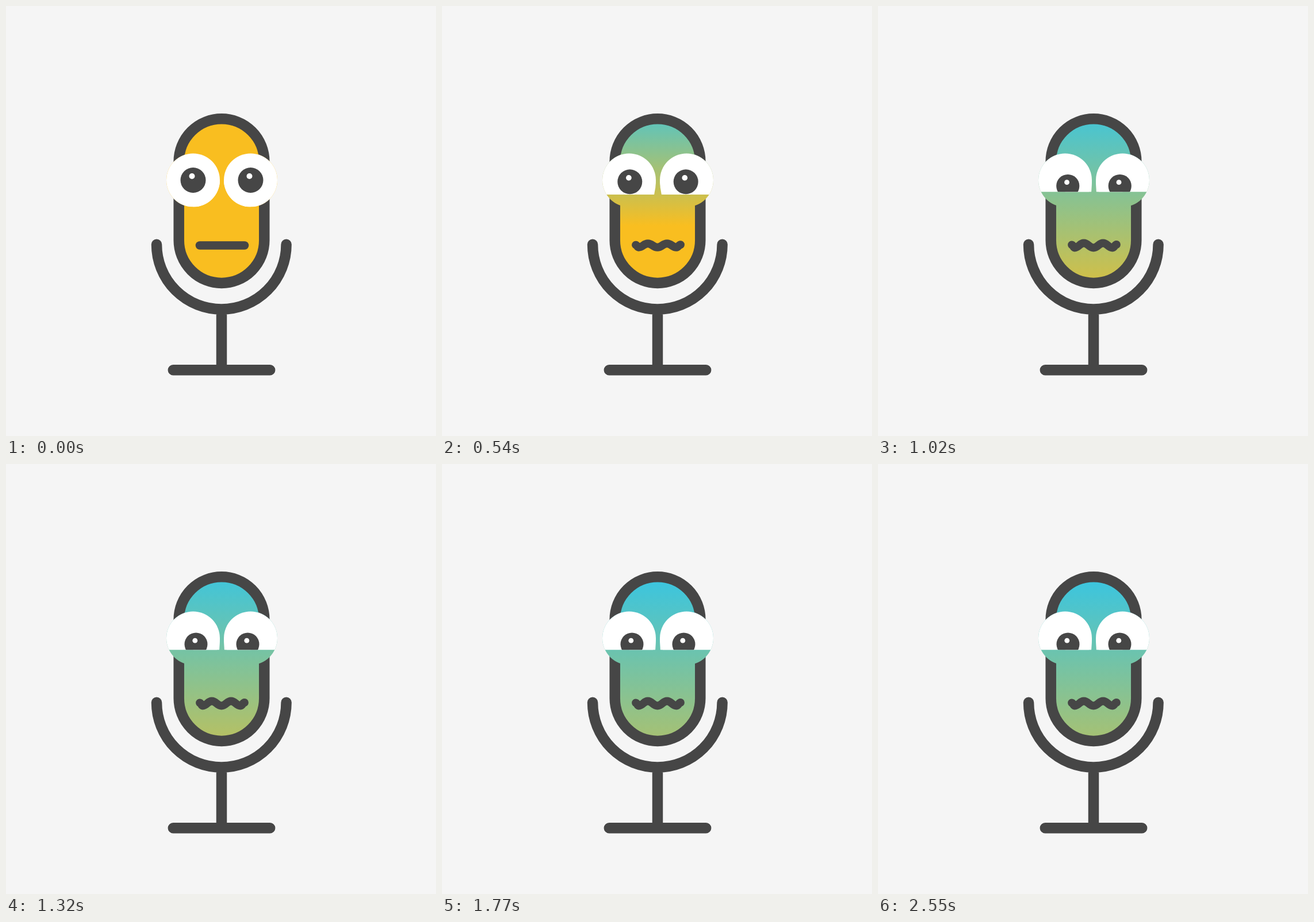
An HTML page with a canvas that plays this animation: 748x748 px, repeating every 2580 ms.

```html
<!DOCTYPE html>
<html lang="en">
<head>
<meta charset="utf-8">
<title>Queasy microphone</title>
<style>
  html, body { margin: 0; width: 100%; height: 100%; overflow: hidden; background: #f5f5f5; }
  canvas { display: block; }
</style>
</head>
<body>
<canvas id="stage" width="748" height="748"></canvas>
<script>
const ctx = document.getElementById('stage').getContext('2d');
const LOOP = 2580, STEP = 30;
const DARK = '#464646', BLUE = '#3cc5de', YELLOW = '#f9be20';
const EYE_Y = 303, EYE_R = 46.5, MOUTH_Y = 416.5;

const mix = (a, b, k) => a + (b - a) * k;
const progress = (t, from, to) => Math.min(1, Math.max(0, (t - from) / (to - from)));
const smooth = p => p * p * (3 - 2 * p);

function disc(x, y, r, color) {
  ctx.fillStyle = color;
  ctx.beginPath();
  ctx.arc(x, y, r, 0, 2 * Math.PI);
  ctx.fill();
}

function stroke(width) {
  ctx.strokeStyle = DARK;
  ctx.lineWidth = width;
  ctx.lineCap = ctx.lineJoin = 'round';
  ctx.stroke();
}

// Blue flows in from the top while the yellow end sinks below the body.
function skinColor(t) {
  const p = progress(t, 0, 1740);
  const yellowY = 690 - 568 * (1 - p) ** 1.65;
  const blueY = Math.min(140 + 65 * p, yellowY - 40);
  const fill = ctx.createLinearGradient(0, blueY, 0, yellowY);
  fill.addColorStop(0, BLUE);
  fill.addColorStop(1, YELLOW);
  return fill;
}

function drawStand() {
  ctx.beginPath();
  ctx.arc(374.8, 414.8, 112.8, Math.PI, 0, true);
  ctx.moveTo(375, 528);
  ctx.lineTo(375, 633);
  ctx.moveTo(290.8, 633.2);
  ctx.lineTo(459.2, 633.2);
  stroke(18.5);
}

function drawBody(skin) {
  ctx.beginPath();
  ctx.roundRect(300.7, 196.3, 148.6, 285.6, 74.3);
  ctx.fillStyle = skin;
  ctx.fill();
  stroke(18.5);
}

// side is 1 when the nose lies to the right of the eye, -1 when to the left.
function drawEye(x, side, skin, lid, look) {
  const lidY = mix(EYE_Y + EYE_R, 323.3, lid);
  disc(x, EYE_Y, EYE_R, skin);

  ctx.save();
  ctx.beginPath();
  ctx.rect(x - 60, 240, 120, lidY - 240);
  ctx.clip();
  disc(x, EYE_Y, EYE_R, '#fff');
  // The inner edge straightens as the lid rises.
  ctx.beginPath();
  ctx.ellipse(x, EYE_Y, EYE_R, EYE_R + 55 * lid ** 4, 0,
    side > 0 ? 0 : Math.PI, Math.PI / 2, side < 0);
  ctx.lineTo(x, EYE_Y);
  ctx.fill();

  const px = x + side * 5 * look;
  const py = EYE_Y + 10.5 * look;
  disc(px, py, mix(22, 20, look), DARK);
  disc(px - mix(2, 1.7, look), py - mix(7, 6.3, look), mix(5, 4.4, look), '#fff');
  ctx.restore();
}

function drawMouth(wave) {
  const bends = [[337, -1], [342, 4], [358, -4], [374.8, 4], [391.5, -4], [408, 4], [415, -1.5]];
  let [px, py] = [337, MOUTH_Y - wave];
  ctx.beginPath();
  ctx.moveTo(px, py);
  for (const [x, dy] of bends.slice(1)) {
    const y = MOUTH_Y + dy * wave, half = (x - px) * 0.45;
    ctx.bezierCurveTo(px + half, py, x - half, y, x, y);
    [px, py] = [x, y];
  }
  stroke(mix(14.6, 13.8, wave));
}

function draw(now) {
  const t = Math.floor(now % LOOP / STEP) * STEP;
  const queasy = smooth(progress(t, 0, 740));
  const look = smooth(progress(t, 240, 1140));
  const skin = skinColor(t);

  ctx.fillStyle = '#f5f5f5';
  ctx.fillRect(0, 0, 748, 748);
  drawStand();
  drawBody(skin);
  drawEye(325.5, 1, skin, queasy, look);
  drawEye(425.5, -1, skin, queasy, look);
  drawMouth(queasy);
}

let start;
function tick(now) {
  start ??= now;
  draw(now - start);
  requestAnimationFrame(tick);
}
draw(0);
requestAnimationFrame(tick);
</script>
</body>
</html>
```
